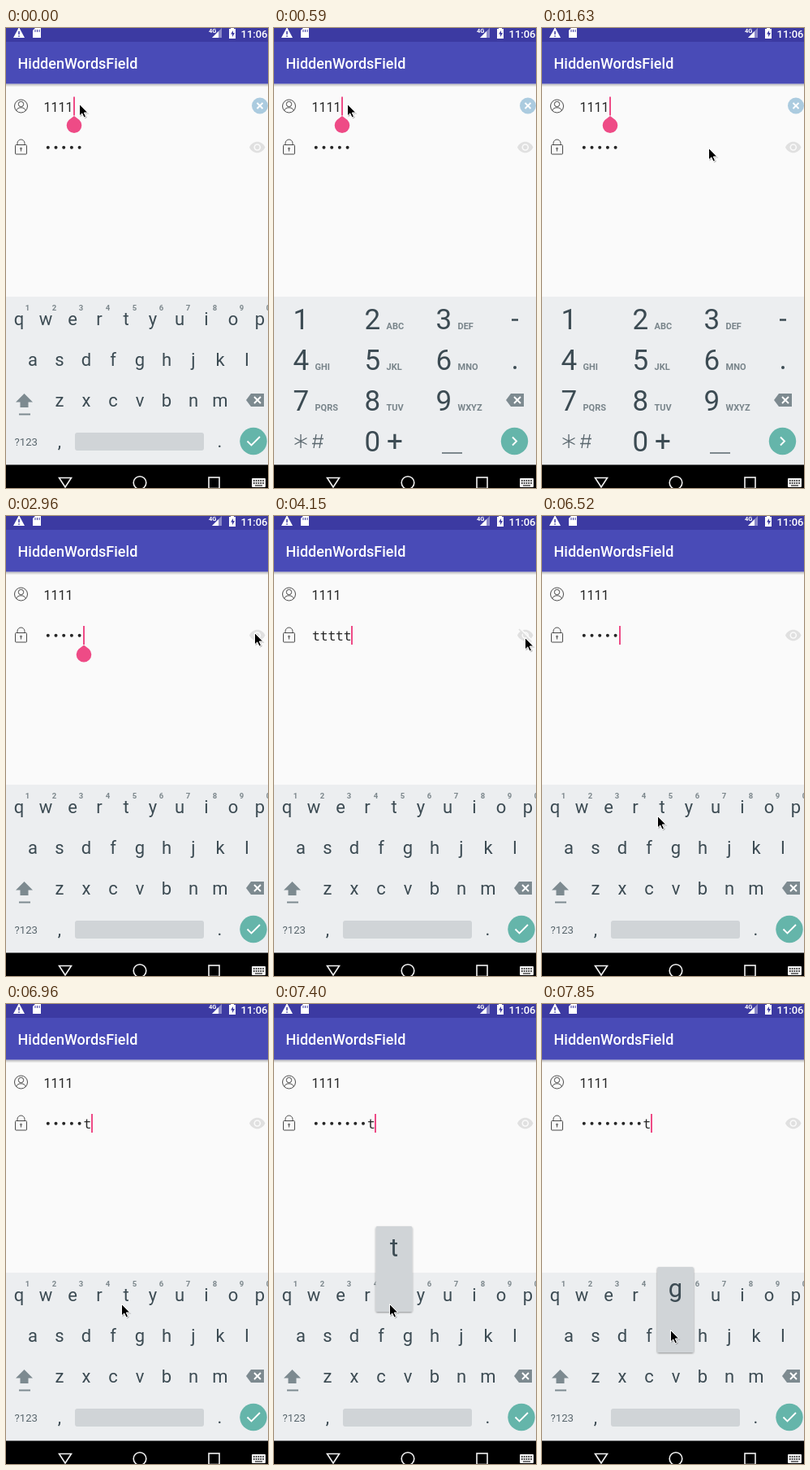
Animation, 323 px wide and 565 px high, one loop 8 s. Source, as an HTML page:

```html
<!DOCTYPE html>
<html lang="en">
<head>
<meta charset="utf-8">
<title>Password field</title>
<style>
html, body { margin: 0; width: 100%; height: 100%; overflow: hidden; background: #fafafa; }
svg { display: block; width: 100vw; height: 100vh; font-family: Roboto, sans-serif; }
.key { font-size: 22px; fill: #3c4b53; text-anchor: middle; }
.hint { font-size: 9.5px; font-weight: 700; fill: #7b868b; text-anchor: middle; }
.num { font-size: 35px; fill: #3c4b53; }
.sub { font-size: 11px; font-weight: 700; fill: #78848a; }
.mono { font-family: "Noto Sans Mono", monospace; font-size: 16.2px; fill: #262626; }
.line { fill: none; stroke: #4a4a4a; stroke-width: 1; }
.nav { fill: none; stroke: #f2f2f2; stroke-width: 1.6; }
.tick { fill: none; stroke: #fff; stroke-width: 1.9; }
</style>
</head>
<body>
<svg viewBox="0 0 323 565" preserveAspectRatio="none">
  <defs>
    <linearGradient id="shade" x2="0" y2="1">
      <stop stop-color="#000" stop-opacity=".26"/>
      <stop offset="1" stop-color="#000" stop-opacity="0"/>
    </linearGradient>
    <filter id="lift" x="-20%" y="-20%" width="140%" height="140%">
      <feDropShadow dx="0" dy="1" stdDeviation="1" flood-opacity=".4"/>
    </filter>
    <g id="erase">
      <path d="M-11 0L-5-8H11V8H-5Z" fill="#7d8a90"/>
      <path d="M-1-4L7 4M7-4L-1 4" class="tick"/>
    </g>
  </defs>

  <rect width="323" height="565" fill="#fafafa"/>
  <rect y="68.5" width="323" height="4" fill="url(#shade)"/>
  <rect width="323" height="68.5" fill="#494bb7"/>
  <rect width="323" height="17" fill="#3c3aa2"/>

  <g id="status" fill="#fff">
    <path d="M16-1L23 12H9Z"/>
    <path d="M16 4V8M16 9.3V10.8" stroke="#3c3aa2" stroke-width="1.5"/>
    <path d="M36 0H43V12H33V3Z"/>
    <path d="M36 2V5M38.5 2V5M41 2V5" stroke="#3c3aa2"/>
    <path d="M254 12L266 0V12Z" fill-opacity=".4"/>
    <path d="M254 12L262 4V12Z"/>
    <text x="250" y="6" font-size="7.5" font-weight="700">4G</text>
    <path d="M275 1H277V-1H281V1H283V13H275Z"/>
    <path d="M280 3L277 7.5H279V11L282 6H280Z" fill="#3c3aa2"/>
    <text x="289.5" y="11.5" font-size="13" font-weight="500">11:06</text>
  </g>
  <text x="14.5" y="50" font-size="18" font-weight="500" fill="#fff">HiddenWordsField</text>

  <g class="line">
    <circle cx="18.5" cy="96" r="8"/>
    <circle cx="18.5" cy="93.5" r="3.2"/>
    <path d="M12.5 101.5C14 96.5 23 96.5 24.5 101.5"/>
    <rect x="11.5" y="143.5" width="14" height="11.5" rx="1"/>
    <path d="M14 143.500V141.500A4.500 4.500 0 0 1 23 141.500V143.500M18.500 148.500V151.500"/>
    <circle cx="18.5" cy="148" r=".9"/>
  </g>
  <text x="46.5" y="102.5" font-size="16" fill="#262626">1111</text>
  <g id="clear">
    <circle cx="313" cy="95.5" r="10" fill="#abcbdf"/>
    <path d="M309.5 92L316.5 99M316.5 92L309.5 99" class="tick"/>
  </g>
  <g id="eye" fill="#e0e0e0">
    <path d="M300 146.5C304 137.5 315.5 137.5 319.5 146.5C315.5 155.5 304 155.5 300 146.5Z"/>
    <circle cx="309.8" cy="146.5" r="4.3" fill="#fafafa"/>
    <circle cx="309.8" cy="146.5" r="2.7"/>
    <g id="slash" fill="none">
      <path d="M303.5 138.5L319 154" stroke="#fafafa" stroke-width="2"/>
      <path d="M302 139L317.5 154.5" stroke="#e0e0e0" stroke-width="1.6"/>
    </g>
  </g>
  <g id="secret" class="mono"></g>

  <rect y="330" width="323" height="207" fill="#eceef0"/>
  <g id="qwerty"></g>
  <g id="digits"></g>
  <rect y="536.5" width="323" height="29" fill="#000"/>
  <g class="nav">
    <path d="M65.5 552.5H80.5L73 564Z"/>
    <circle cx="165" cy="558.5" r="7.8"/>
    <rect x="250" y="552" width="13" height="13.5"/>
  </g>
  <rect x="303" y="553" width="17" height="11" rx="1" fill="#f2f2f2"/>
  <path d="M305 556H318M305 559H318" stroke="#000" stroke-width="1.5" stroke-dasharray="1.6 1.2"/>
  <path d="M307 562H316" stroke="#000"/>

  <g id="mark" fill="#ee4b86">
    <rect id="caret" x="-1" width="2" height="23"/>
    <path id="handle" d="M0 23.5L6.5 28.5A9.3 9.3 0 1 1-6.500 28.500Z"/>
  </g>
  <g id="popup">
    <rect x="-22.5" y="-84" width="45" height="105" rx="2" fill="#d0d4d7" filter="url(#lift)"/>
    <text id="letter" class="key" y="-47" style="font-size:31px"></text>
  </g>
  <g id="pointer">
    <path d="M1 2V16L4 13.500L7 18L9.500 16.500L7.500 12H12Z" fill="#000" opacity=".22"/>
    <path d="M0 0V14.500L3.300 11.400L5.600 16.500L8 15.400L5.800 10.500H10.300Z" stroke="#fff"/>
  </g>
</svg>

<script>
const LOOP = 8000, STEP = 148, LAST = 53, PITCH = 9.7;
const $ = id => document.getElementById(id);
const text = (cls, x, y, s) => `<text class="${cls}" x="${x}" y="${y}">${s}</text>`;
const show = (id, on) => $(id).setAttribute("visibility", on ? "inherit" : "hidden");
const move = (id, x, y) => $(id).setAttribute("transform", `translate(${x} ${y})`);
const within = (n, spans) => spans.some(([a, b]) => n >= a && n < b);
const erase = x => `<use href="#erase" x="${x}" y="457"/>`;
const enter = (x, d) =>
  `<circle cx="${x}" cy="507.5" r="16.7" fill="#65b5aa"/><path class="tick" d="${d}"/>`;

function buildQwerty() {
  const rows = [["qwertyuiop", 16], ["asdfghjkl", 33], ["zxcvbnm", 66]];
  let out = "";
  rows.forEach(([keys, left], r) => [...keys].forEach((k, i) => {
    const x = left + i * 33;
    out += text("key", x, 365 + r * 50, k);
    if (!r) out += text("hint", x + 10.5, 347, (i + 1) % 10);
  }));
  out += '<path d="M22.5 449L33 459.5H27.5V466H17.5V459.5H12Z" fill="#7d8a90"/>'
    + '<path d="M16 474.5H30" stroke="#7d8a90" stroke-width="2"/>'
    + '<text x="10.5" y="512.5" font-size="13.2" fill="#59666d">?123</text>'
    + '<rect x="85" y="497" width="159" height="22" rx="3" fill="#d0d4d7"/>'
    + text("key", 66, 515, ",") + text("key", 263.5, 515, ".");
  return out + erase(307) + enter(305, "M297.5 507.5L302.500 512.500L313 502");
}

function buildDigits() {
  const subs = ["", "ABC", "DEF", "GHI", "JKL", "MNO", "PQRS", "TUV", "WXYZ"];
  let out = "";
  subs.forEach((s, i) => {
    const x = 23.5 + i % 3 * 88, y = 369.5 + Math.floor(i / 3) * 50;
    out += text("num", x, y, i + 1) + text("sub", x + 27, y, s);
  });
  out += text("num", 111.5, 519.5, "0") + text("num", 139, 519.5, "+")
    + '<path d="M33 499V516M25.5 503.5L40.5 511.5M40.5 503.5L25.5 511.5'
    + 'M52 499L49 516M59 499L56 516M48 504.5H61M47 510.5H60" fill="none" stroke="#59666d" stroke-width="1.3"/>'
    + '<path d="M207 522H232" stroke="#59666d" stroke-width="1.5"/>'
    + '<path d="M293 358.5H301" stroke="#3c4b53" stroke-width="2.5"/>'
    + '<circle cx="297" cy="417" r="2" fill="#3c4b53"/>';
  return out + erase(297) + enter(296.5, "M294 502.5L299 507.5L294 512.5");
}

// Pointer stops: step, x, y
const path = [
  [5, 90.5, 93.5], [11, 205.5, 147.5], [13, 205.5, 147.5], [15, 262, 154], [17, 307, 145],
  [18, 307, 145], [20, 306.5, 143.5], [22, 309.5, 146], [24, 309.5, 146], [25, 309.5, 149.5],
  [33, 309.5, 149.5], [37, 90.5, 171.5], [39, 94.5, 172], [40, 94.5, 172], [44, 142.5, 368.5],
  [50, 142.5, 368.5], [53, 158.5, 400.5]
];
const blinkOff = [[4, 8], [16, 19], [22, 25], [30, 31], [34, 38], [41, 44]];
const presses = [46, 48, 50, 51];

function pointerAt(n) {
  const i = path.findIndex(p => p[0] >= n);
  if (i < 1) return path[0].slice(1);
  const [n0, x0, y0] = path[i - 1], [n1, x1, y1] = path[i];
  const u = (n - n0) / (n1 - n0), e = u * u * (3 - 2 * u);
  return [x0 + (x1 - x0) * e, y0 + (y1 - y0) * e];
}

function drawSecret(n, count) {
  const plain = within(n, [[27, 31]]);
  let out = "";
  for (let i = 0; i < count; i++) {
    const x = 47 + i * PITCH;
    out += plain || (n >= presses[0] && i === count - 1)
      ? text("mono", x, 152.5, "t")
      : `<circle cx="${x + 4.8}" cy="146.7" r="2"/>`;
  }
  $("secret").innerHTML = out;
  show("slash", plain);
}

function draw(n) {
  const first = n < 12, numeric = n >= 1 && first;
  const count = 5 + presses.filter(p => p <= n).length;
  show("clear", first);
  show("digits", numeric);
  show("qwerty", !numeric);
  drawSecret(n, count);

  move("mark", first ? 84 : Math.round(47.5 + count * PITCH), first ? 84.5 : 135);
  show("caret", !within(n, blinkOff));
  show("handle", n < 27);

  const g = n === LAST;
  show("popup", g || presses.includes(n));
  $("letter").textContent = g ? "g" : "t";
  move("popup", g ? 164.5 : 148, g ? 407 : 357);
  move("pointer", ...pointerAt(n));
}

$("qwerty").innerHTML = buildQwerty();
$("digits").innerHTML = buildDigits();

let shown = -1;
function tick() {
  const n = Math.min(LAST, Math.floor(performance.now() % LOOP / STEP));
  if (n !== shown) draw(shown = n);
  requestAnimationFrame(tick);
}
tick();
</script>
</body>
</html>
```
